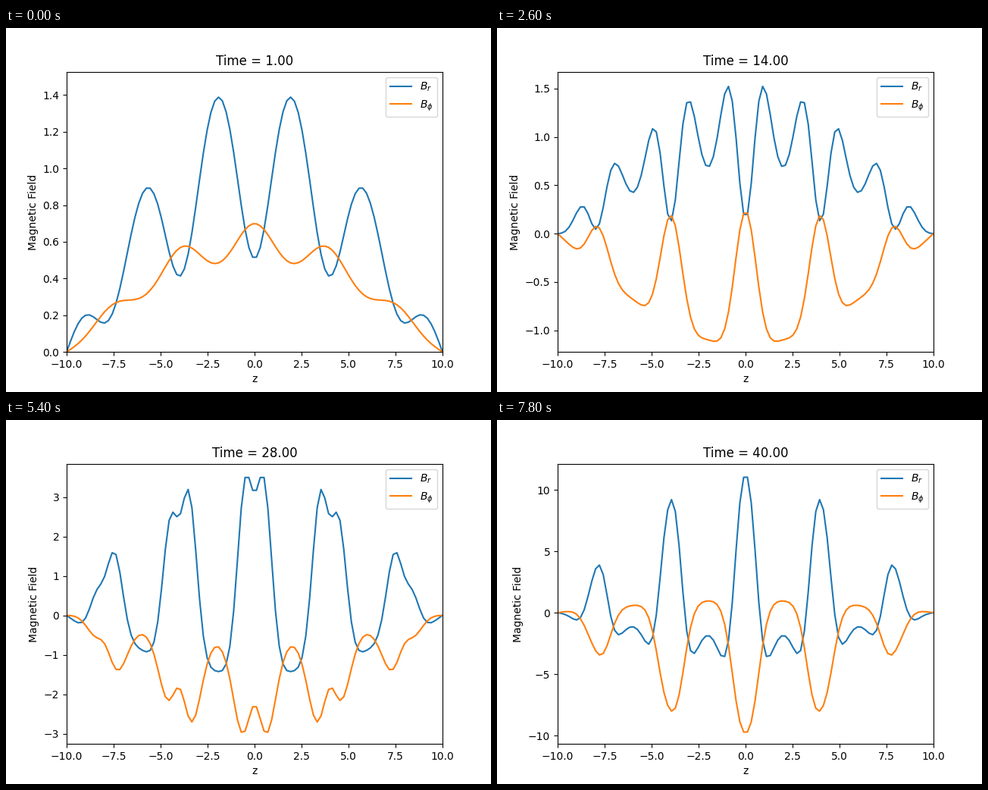
Recreate the animation shown at these times as a matplotlib script. Size 640 by 480 pixels, loop 8000 ms.

```python
import numpy as np
import matplotlib.pyplot as plt
from matplotlib.animation import FuncAnimation

# Alpha-omega dynamo on a slab, forward Euler in time
HALF = 10.0
POINTS = 100
FRAMES = 40
SUBSTEPS = 5
DT = 0.0993 / SUBSTEPS
LEAD = 4          # output intervals before the first shown state
ETA = 0.1
SHEAR = -1.0

z = np.linspace(-HALF, HALF, POINTS)
dz = z[1] - z[0]
alpha = np.sin(np.pi * z / 2)


def ddz(f):
    return np.gradient(f, dz)


def advance(br, bphi):
    for _ in range(SUBSTEPS):
        dbr = -ddz(alpha * bphi) + ETA * ddz(ddz(br))
        dbphi = SHEAR * br + ETA * ddz(ddz(bphi))
        br, bphi = br + DT * dbr, bphi + DT * dbphi
        for field in (br, bphi):
            field[0] = field[-1] = 0.0
    return br, bphi


def solve():
    start = np.cos(np.pi * z / (2 * HALF))
    start[0] = start[-1] = 0.0
    state = (start, start.copy())
    history = []
    for i in range(LEAD + FRAMES):
        if i >= LEAD:
            history.append(state)
        state = advance(*state)
    return history


history = solve()

fig, ax = plt.subplots(figsize=(6.4, 4.8), dpi=100)
line_r, = ax.plot([], [], label=r"$B_r$")
line_phi, = ax.plot([], [], label=r"$B_\phi$")
ax.set_xlim(-HALF, HALF)
ax.set_xlabel("z")
ax.set_ylabel("Magnetic Field")
ax.legend(loc="upper right")


def draw(i):
    br, bphi = history[i]
    line_r.set_data(z, br)
    line_phi.set_data(z, bphi)
    ax.set_ylim(1.1 * min(br.min(), bphi.min()),
                1.1 * max(br.max(), bphi.max()))
    ax.set_title(f"Time = {i + 1:.2f}")
    return line_r, line_phi


anim = FuncAnimation(fig, draw, frames=FRAMES, interval=200,
                     init_func=lambda: draw(0), repeat=True, repeat_delay=0)
plt.show()
```
